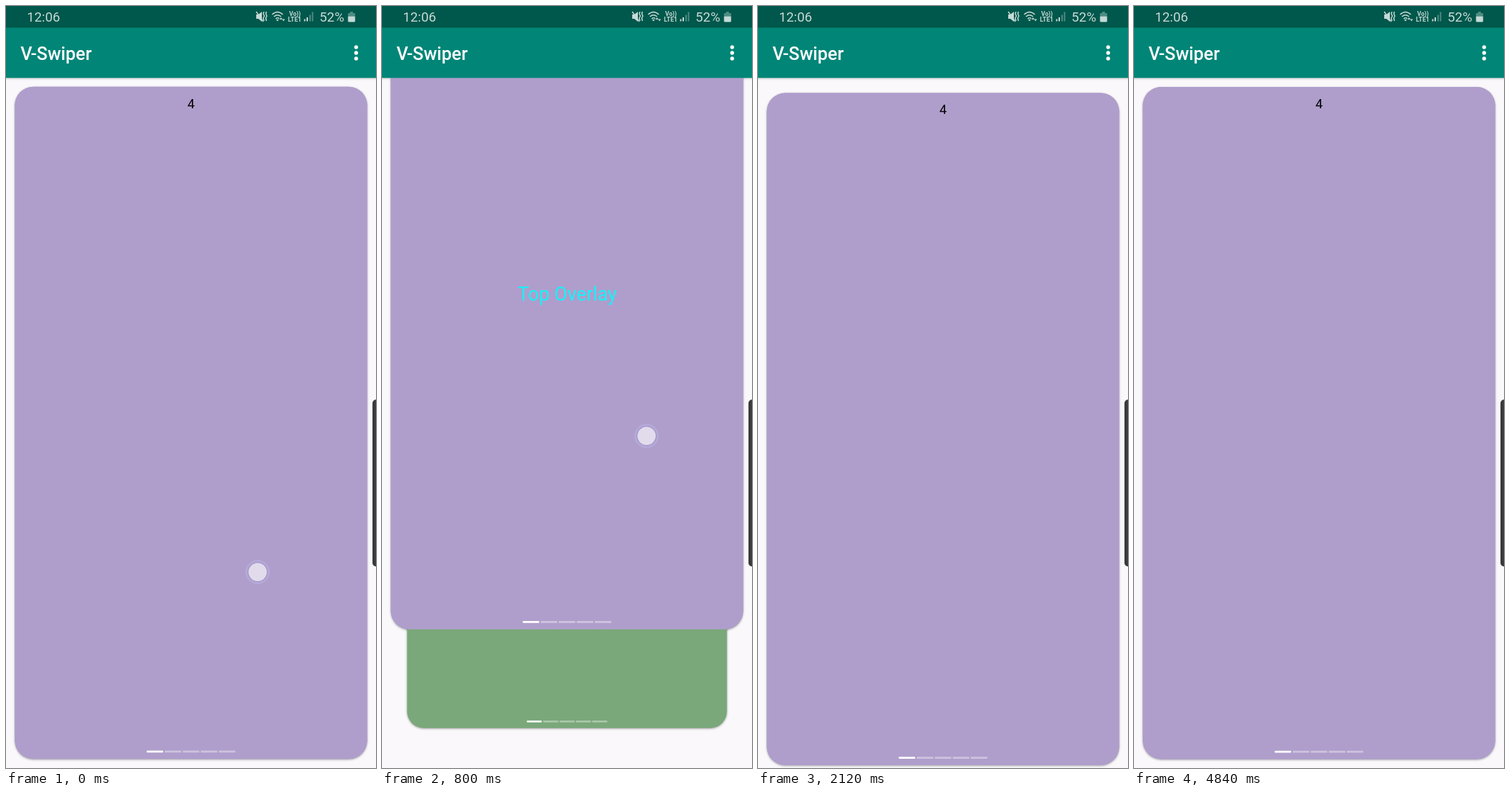
These frames come from a looping animation (522x1073 px, 5440 ms). An HTML page:

```html
<!DOCTYPE html>
<html lang="en">
<head>
<meta charset="utf-8">
<title>V-Swiper</title>
<style>
  html, body { margin: 0; width: 100%; height: 100%; overflow: hidden; background: #faf8fb; }
  svg { display: block; width: 522px; height: 1073px; font-family: Roboto, sans-serif; }
  .mid { text-anchor: middle; }
  .shadow { filter: drop-shadow(0 1.8px 1.8px rgba(0, 0, 0, .36)); }
  .status { fill: #c5d9d6; font-size: 18.8px; }
  .line { fill: none; stroke: #c5d9d6; stroke-width: 1.5; }
</style>
</head>
<body>
<svg viewBox="0 0 522 1073">
  <defs>
    <linearGradient id="shade" x2="0" y2="1">
      <stop stop-color="#000" stop-opacity=".14"/>
      <stop offset="1" stop-color="#000" stop-opacity="0"/>
    </linearGradient>
    <rect id="card" x="12.5" y="114" width="497" height="946.5" rx="26"/>
    <g id="dashes" fill="#fff">
      <rect x="198.5" y="1048.8" width="23.3" height="2.8" rx="1"/>
      <path d="M224 1048.8h23.3v2.8h-23.3zm25.4 0h23.3v2.8h-23.3zm25.4 0h23.3v2.8h-23.3zm25.4 0h23.3v2.8h-23.3z" opacity=".38"/>
    </g>
  </defs>
  <rect width="522" height="1073" fill="#faf8fb"/>
  <rect y="101" width="522" height="4" fill="url(#shade)"/>

  <!-- The front card casts its shadow on the page, not on the back card -->
  <g id="under"><use class="shadow" href="#card" fill="#af9ecb"/></g>
  <g id="back">
    <use class="shadow" href="#card" fill="#7aa87a"/>
    <use href="#dashes"/>
  </g>
  <g id="front">
    <use href="#card" fill="#af9ecb"/>
    <text class="mid" x="261" y="144" font-size="18.2">4</text>
    <text id="overlay" class="mid" x="261.3" y="597.5" font-size="26.8" fill="#0ff">Top Overlay</text>
    <use href="#dashes"/>
  </g>

  <rect width="522" height="101.3" fill="#008577"/>
  <rect width="522" height="30.5" fill="#00574b"/>
  <text x="20.5" y="75.7" font-size="25.4" font-weight="500" fill="#fff">V-Swiper</text>
  <g fill="#fff">
    <circle cx="494" cy="58" r="2.7"/><circle cx="494" cy="66" r="2.7"/><circle cx="494" cy="74" r="2.7"/>
  </g>

  <g class="status">
    <text x="29.5" y="22.2">12:06</text>
    <text x="442.3" y="22.2">52%</text>
    <path d="M353 12h3l5-4v14l-5-4h-3z"/>
    <path class="line" d="M353 8l10 14M364 8l-1 3 1.500 3-1.500 3 1 4M367.500 8l-1 3 1.500 3-1.500 3 1 4"/>
    <path class="line" d="M375.500 12q7.500-7 15 0M378 15q5-4.500 10 0M380.500 17.800q2.500-2 5 0"/>
    <path d="M381 19h4l-2 2.500zM386 19l2-3 2 3zM389.500 18.500h4l-2 3z"/>
    <g font-size="8.6" font-weight="700">
      <text x="399.500" y="13.600">Vo))</text>
      <text x="397.800" y="22.300">LTE1</text>
    </g>
    <path d="M420.500 18.500h2v3h-2zM424 16h2v5.500h-2z"/>
    <path d="M428 12.500h2v9h-2zM431.500 8.500h2v13h-2z" opacity=".4"/>
    <path d="M485.500 8h4v2h3v4.500h-10v-4.500h3z" opacity=".4"/>
    <path d="M482.500 14.500h10v7q0 1-1 1h-8q-1 0-1-1z"/>
  </g>

  <rect x="517" y="554.2" width="12" height="235" rx="5" fill="#3b3b3d"/>

  <g id="toast">
    <rect x="147" y="935.800" width="227.500" height="56.200" rx="28.100" fill="#5b595d"/>
    <text class="mid" x="261" y="964.800" font-size="14" fill="#fff">Release to action from top</text>
  </g>
  <g id="finger">
    <circle r="16.500" fill="#b3a7d6" stroke="#b9afd9"/>
    <circle r="13.500" fill="#e2dbec" stroke="#a297cb" stroke-width="1.2"/>
  </g>
</svg>
<script>
const LOOP = 5440, RELEASE = 1700, RETURN = 600, MAX_PULL = 236;
const path = [[0, 355, 797.3], [240, 363, 734.7], [800, 373.2, 605.7], [1360, 392.3, 346.5], [1520, 393.8, 320]];
const el = id => document.getElementById(id);
const [under, back, front, overlay, toast, finger] =
  ['under', 'back', 'front', 'overlay', 'toast', 'finger'].map(el);
const clamp = v => Math.max(0, Math.min(1, v));

function slope(i, axis) {
  if (i === path.length - 1) return 0;
  const a = path[Math.max(0, i - 1)], b = path[i + 1];
  return (b[axis] - a[axis]) / (b[0] - a[0]);
}

// Cubic Hermite through the touch points
function touch(t, axis) {
  const last = path.length - 1;
  if (t >= path[last][0]) return path[last][axis];
  let i = 0;
  while (t >= path[i + 1][0]) i++;
  const a = path[i], b = path[i + 1], h = b[0] - a[0], u = (t - a[0]) / h, v = 1 - u;
  return a[axis] * v * v * (1 + 2 * u) + b[axis] * u * u * (3 - 2 * u)
    + h * u * v * (v * slope(i, axis) - u * slope(i + 1, axis));
}

// Upward card travel: follows the finger to a limit, then overshoots back
function pull(t) {
  if (t < RELEASE) return Math.min(MAX_PULL, (path[0][2] - touch(t, 2)) * .952);
  const u = clamp((t - RELEASE) / RETURN) - 1;
  return -MAX_PULL * u * u * (2 * u + 1);
}

function draw(t) {
  const d = pull(t), scale = .85 + .000316 * Math.max(0, d);
  for (const g of [under, front]) g.setAttribute('transform', `translate(0 ${-d})`);
  back.setAttribute('transform', `translate(261 587.2) scale(${scale}) translate(-261 -587.2)`);
  overlay.setAttribute('opacity', clamp(d / 215));
  finger.setAttribute('transform', `translate(${touch(t, 1)} ${touch(t, 2)})`);
  finger.setAttribute('visibility', t < RELEASE ? 'visible' : 'hidden');
  toast.setAttribute('opacity', clamp((t - 2300) / 520) * clamp((4800 - t) / 520));
}

function tick(now) {
  draw(now % LOOP);
  requestAnimationFrame(tick);
}
draw(0);
requestAnimationFrame(tick);
</script>
</body>
</html>
```
